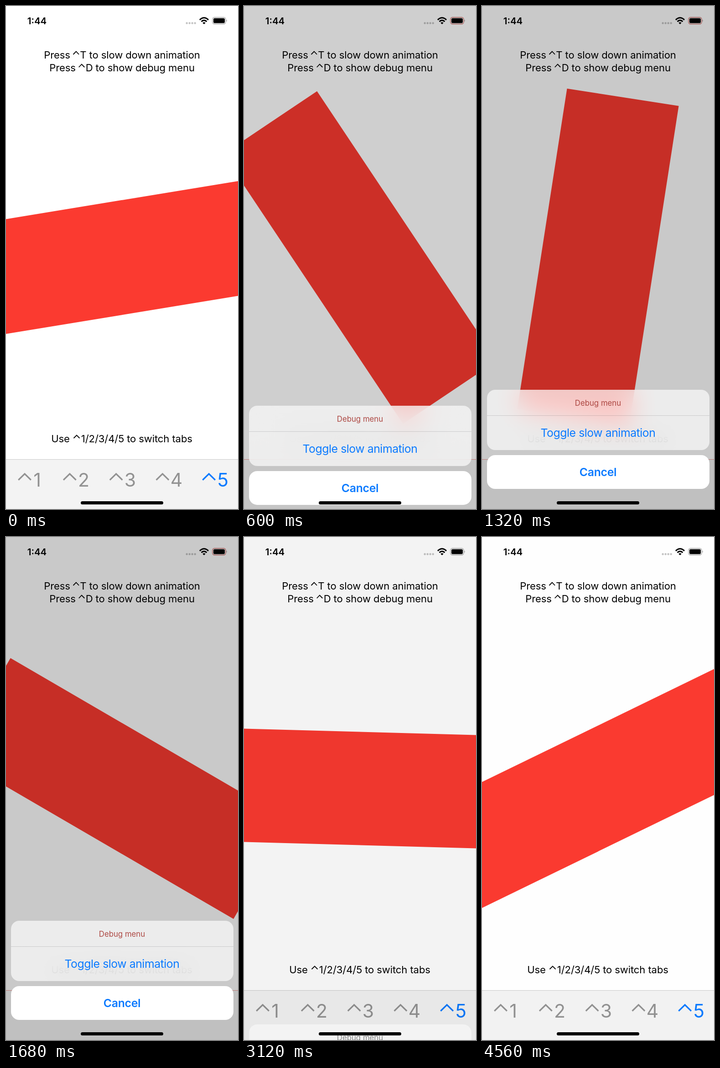
An HTML page for the animation above (4.68 s loop, 509x1101 px).

```html
<!DOCTYPE html>
<html lang="en">
<head>
<meta charset="utf-8">
<title>Debug menu</title>
<style>
  html, body { margin: 0; width: 100%; height: 100%; overflow: hidden; background: #fff; }
  body { position: relative; font-family: Inter, Roboto, sans-serif; }
  svg, #dim { position: absolute; left: 0; top: 0; width: 509px; height: 1101px; }
  text { text-anchor: middle; }
  .body { font-size: 22.1px; letter-spacing: -.12px; }
  .tab { font-size: 41px; fill: #929292; }
  .chevron { fill: none; stroke: #000; stroke-width: 1.8; }
  .tabChevron { fill: none; stroke: #929292; stroke-width: 3.2; }
  .active text { fill: #0a7aff; }
  .active path { stroke: #0a7aff; }
  #hairline { fill: #cbcbcb; }
  #battery { fill: none; stroke: #a9a9a9; stroke-width: 1.4; }
  .warm #hairline { fill: #f09a96; }
  .warm #battery { stroke: #d0706c; }
  .warm #title { color: #ad4843; }
  #dim { background: #000; }
  #sheet { position: absolute; left: 10.5px; top: 840px; width: 488px; text-align: center; color: #0a7aff; }
  #group, #cancel { position: absolute; left: 0; width: 100%; border-radius: 18px; overflow: hidden; }
  #group { top: 0; height: 131.5px; background: rgba(246, 246, 246, .78);
           backdrop-filter: blur(27px) saturate(1.6); }
  #title { height: 57px; line-height: 58px; font-size: 16.8px; color: #858585;
           border-bottom: 1px solid rgba(60, 60, 67, .2); box-sizing: border-box; }
  #toggle { line-height: 75px; font-size: 24.8px; letter-spacing: -.45px; }
  #cancel { top: 142.5px; height: 74.5px; line-height: 75px; background: #fff;
            font-size: 24.8px; font-weight: 600; letter-spacing: -.3px; }
  #home { position: absolute; left: 164px; top: 1084px; width: 181px; height: 6.5px;
          border-radius: 4px; background: #000; }
</style>
</head>
<body>
<svg viewBox="0 0 509 1101">
  <rect id="bar" x="-100.5" y="426.5" width="710" height="248" fill="#fb3a30"/>

  <text x="68" y="39.5" font-size="20.5" font-weight="600">1:44</text>
  <g fill="#c3c3c3">
    <circle cx="396.7" cy="37.5" r="2.2"/><circle cx="402.7" cy="37.5" r="2.2"/>
    <circle cx="408.7" cy="37.5" r="2.2"/><circle cx="414.7" cy="37.5" r="2.2"/>
  </g>
  <g fill="none" stroke="#000" stroke-width="3">
    <path d="M425 30.3Q434.5 21.2 444 30.3"/>
    <path d="M428.6 34.2Q434.5 28.6 440.4 34.2"/>
    <path d="M434.5 40L431.3 36.8Q434.5 34 437.7 36.8Z" fill="#000" stroke="none"/>
  </g>
  <rect id="battery" x="453" y="24.7" width="29" height="14.8" rx="4.5"/>
  <rect x="455" y="26.7" width="25" height="10.8" rx="2.8"/>
  <path d="M483.5 29.8Q486.5 32.1 483.5 34.4Z" fill="#a9a9a9"/>

  <g class="body">
    <text x="112" y="115">Press</text>
    <path class="chevron" d="M147.5 106L153.8 99.5L160 106"/>
    <text x="294" y="115">T to slow down animation</text>
    <text x="124" y="143">Press</text>
    <path class="chevron" d="M159.8 134L166 127.5L172.3 134"/>
    <text x="294.3" y="143">D to show debug menu</text>
    <text x="119.5" y="955">Use</text>
    <path class="chevron" d="M148.5 946L155 939.5L161.5 946"/>
    <text x="212" y="955">1/2/3/4/5</text>
    <text x="337" y="955">to switch tabs</text>
  </g>

  <rect y="993" width="509" height="108" fill="#f3f3f3"/>
  <rect id="hairline" y="992" width="509" height="1"/>
  <g id="tabs"></g>
</svg>
<div id="dim"></div>
<div id="sheet">
  <div id="group">
    <div id="title">Debug menu</div>
    <div id="toggle">Toggle slow animation</div>
  </div>
  <div id="cancel">Cancel</div>
</div>
<div id="home"></div>

<script>
const LOOP = 4680, STEP = 120;
const PRESENT = 449;          // sheet starts to rise
const DIM = 410;              // backdrop starts to darken
const TOGGLE = 1686.5;        // sheet leaves and time runs ten times slower
const SHEET_TRAVEL = 267, DIM_ALPHA = 0.212;

const $ = id => document.getElementById(id);

// Labels are centred in their cells, so the narrow 1 moves its chevron inwards.
$('tabs').innerHTML = [1, 2, 3, 4, 5].map(n => {
  const x = 23.2 + (n - 1) * 101.8;
  return `<g class="${n === 5 ? 'active' : ''}">
    <path class="tabChevron" d="M${x + (n === 1 ? 4 : 1)} 1037.5l13.8 -13.5l13.8 13.5"/>
    <text class="tab" x="${x + 45.5}" y="1052">${n}</text></g>`;
}).join('');

// Share of the way still to go on a critically damped spring.
function remaining(ms, omega) {
  const x = omega * Math.max(0, ms) / 1000;
  return Math.exp(-x) * (1 + x);
}

function draw(t) {
  const clock = Math.min(t, TOGGLE) + Math.max(0, t - TOGGLE) / 10;
  const shown = (start, omega) => t < TOGGLE
    ? 1 - remaining(clock - start, omega)
    : remaining(clock - TOGGLE, omega);

  $('bar').setAttribute('transform', `rotate(${-9.3 - 0.1908 * clock} 254.5 550.5)`);
  $('dim').style.opacity = DIM_ALPHA * shown(DIM, 20);
  $('sheet').style.transform = `translateY(${SHEET_TRAVEL * (1 - shown(PRESENT, 23.5))}px)`;
  document.body.classList.toggle('warm', t > PRESENT && t < TOGGLE);
}

function tick() {
  const t = performance.now() % LOOP;
  draw(Math.floor(t / STEP) * STEP);
  requestAnimationFrame(tick);
}
tick();
</script>
</body>
</html>
```
